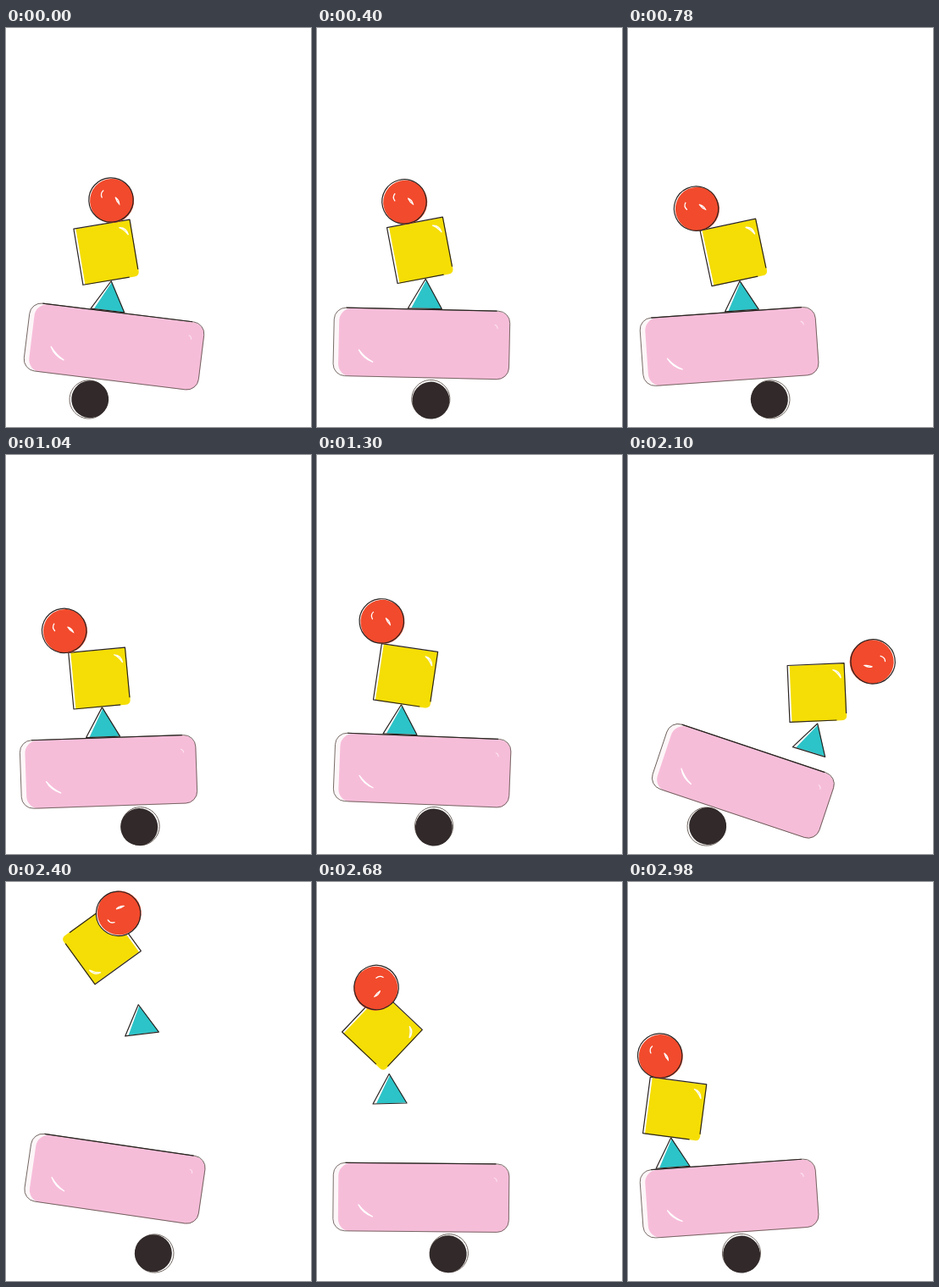
Animation, 360 px wide and 471 px high, one loop 3 s. Source, as an HTML page:

```html
<!DOCTYPE html>
<html lang="en">
<head>
<meta charset="utf-8">
<title>Balancing shapes</title>
<style>
  html, body { margin: 0; width: 100%; height: 100%; overflow: hidden; background: #fff; }
  svg { display: block; width: 360px; height: 471px; }
  .line { fill: none; stroke: #2b2422; stroke-width: 1.2; stroke-linejoin: round; }
  .thin { stroke: #6b605a; stroke-width: .9; }
  .shine { fill: none; stroke: #fff; stroke-width: 1.3; stroke-linecap: round; }
  .faint { stroke-width: 1; opacity: .6; }
</style>
</head>
<body>
<svg viewBox="0 0 360 471">
  <g id="ball">
    <circle class="line thin" cy="-.4" r="22.6"/>
    <circle cy="1.2" r="22" fill="#322a2a"/>
  </g>
  <g id="plank">
    <rect x="-104" y="-40.5" width="207" height="80.5" rx="14" fill="#fdf6f8"/>
    <rect x="-98" y="-40" width="202" height="80.5" rx="15" fill="#f6bdd9"/>
    <rect class="line thin" x="-104" y="-40.5" width="207.5" height="80.5" rx="14"/>
    <path class="line" d="M-90 -40.5H88"/>
    <path class="shine" d="M-74 9Q-69 19 -57 23Q-67 18 -74 9"/>
    <path class="shine faint" d="M86 -24Q89 -23 89 -20"/>
  </g>
  <g id="tri">
    <path d="M0 -35L20 0H-20Z" fill="#fff"/>
    <path d="M1 -34L20 -.5H-16Z" fill="#2cc4c8"/>
    <path class="line" d="M0 -35L20 0H-20Z"/>
  </g>
  <g id="box">
    <path d="M-34 -33H34V33H-34Z" fill="#fff"/>
    <path d="M-31 -33H34V28Q34 34 28 34H-31Z" fill="#f5de05"/>
    <path class="line" d="M33.5 26V-33.5H-33.5V33.5H22"/>
    <path class="shine" d="M20 -26Q28 -25 29 -16Q25 -23 20 -26"/>
  </g>
  <g id="red">
    <circle cx="-.6" cy="-.6" r="26.3" fill="#fff"/>
    <circle cx=".6" cy=".6" r="26" fill="#f24a2c"/>
    <circle class="line" cx="-.4" cy="-.4" r="26.2"/>
    <path class="shine" d="M-9 -12Q-13 -9 -11 -4"/>
    <path class="shine" d="M5 -3Q6 2 9 5Q9 0 5 -3"/>
  </g>
</svg>
<script>
const LOOP = 3000, STEP = 20, SLIP = 1700, TOSS = 2100, PEAK = 2400, LAND = 2780;
const rad = Math.PI / 180;

// Balance: ball x, plank tilt, triangle along plank, box turn, red along box.
const poses = [
  { t: 0, ball: 98, tilt: 7, tri: -13, box: -9.5, red: 16 },
  { t: 780, ball: 168, tilt: -4, tri: 17.5, box: -12, red: -32 },
  { t: 1300, ball: 138, tilt: 2.3, tri: -28, box: 8.5, red: -37 },
  { t: SLIP, ball: 84.5, tilt: 14.3, tri: -2.5, box: 45, red: -2 }
];
const rest = { tri: -64, box: 7.5, red: -25 };
poses.push(
  { t: TOSS, ball: 93, tilt: 18.5, ...rest },
  { t: PEAK, ball: 175, tilt: 8.3, ...rest },
  { t: LOOP - STEP, ball: 134, tilt: -4, ...rest }
);

// Flight: [x, y, turn] when tossed and at the top; dip is the fall before the toss.
const flights = {
  tri: { dip: 22, toss: [213.5, 350.5, 17], peak: [160.5, 179.5, -7], turns: 0 },
  box: { dip: 60, toss: [223, 280.5, -2.5], peak: [112.5, 74, -216], turns: -360 },
  red: { dip: 120, toss: [288.5, 244, 125], peak: [133, 37, -85], turns: -360 }
};

const part = (t, from, to) => Math.min(1, Math.max(0, (t - from) / (to - from)));
const hump = u => Math.sin(Math.PI * u);
const mix = (a, b, u) => a + (b - a) * u;
const slope = (a, b, k) => (b[k] - a[k]) / (b.t - a.t);

// Smooth curve through the poses that never overshoots them.
function tangent(i, k) {
  if (!i || i === poses.length - 1) return 0;
  const a = slope(poses[i - 1], poses[i], k), b = slope(poses[i], poses[i + 1], k);
  return a * b > 0 ? 2 * a * b / (a + b) : 0;
}

function sway(t, k) {
  let i = 0;
  while (i < poses.length - 2 && t >= poses[i + 1].t) i++;
  const a = poses[i], b = poses[i + 1], d = b.t - a.t, u = part(t, a.t, b.t);
  return mix(a[k], b[k], u * u * (3 - 2 * u)) +
    u * (1 - u) * d * (tangent(i, k) * (1 - u) - tangent(i + 1, k) * u);
}

// Point at (dx, dy) in the frame of a placed shape.
function on([x, y, turn], dx, dy) {
  const c = Math.cos(turn * rad), s = Math.sin(turn * rad);
  return [x + dx * c - dy * s, y + dx * s + dy * c];
}

// Everything stacked: each shape rests on the one below.
function stack(t) {
  const x = sway(t, 'ball'), boxTurn = sway(t, 'box'), redAt = sway(t, 'red');
  const tilt = sway(t, 'tilt') + 4 * hump(part(t, SLIP, TOSS));
  const px = 122.7 + .72 * tilt;
  const hop = 16 * hump(part(t, TOSS, 2600));
  const py = 413.2 - 40.3 / Math.cos(tilt * rad) - (x - px) * Math.tan(tilt * rad) - hop;
  const ball = [x, 438.4, (x - 136) / 22.5 / rad];
  const plank = [px, py, tilt];
  const tri = [...on(plank, sway(t, 'tri'), -41.5), tilt];
  const box = [...on([...on(tri, 0, -35), boxTurn], 0, -34.5), boxTurn];
  const red = [...on(box, redAt, -59.5), boxTurn + .4 * redAt];
  return { ball, plank, tri, box, red };
}

const slipped = stack(SLIP);

function fly(id, t, home) {
  const { dip, toss, peak, turns } = flights[id];
  if (t < TOSS) {
    const u = part(t, SLIP, TOSS), h = hump(u) * dip;
    const add = [.55 * h, h, h / 2];
    return toss.map((v, i) => mix(slipped[id][i], v, u) + add[i]);
  }
  if (t < PEAK) {
    const u = part(t, TOSS, PEAK);
    const ease = [u * (3 - u) / 2, u * (2 - u), u];
    return peak.map((v, i) => mix(toss[i], v, ease[i]));
  }
  const u = part(t, PEAK, LAND), ease = [u, u * u, u];
  const end = [home[0], home[1], home[2] + turns];
  return end.map((v, i) => mix(peak[i], v, ease[i]));
}

function draw(t) {
  const scene = stack(t);
  for (const id in scene) {
    const loose = flights[id] && t > SLIP;
    const [x, y, turn] = loose ? fly(id, t, scene[id]) : scene[id];
    document.getElementById(id)
      .setAttribute('transform', `translate(${x} ${y}) rotate(${turn})`);
  }
}

const start = performance.now();
function tick() {
  const t = (performance.now() - start) % LOOP;
  draw(Math.floor(t / STEP) * STEP);
  requestAnimationFrame(tick);
}
draw(0);
requestAnimationFrame(tick);
</script>
</body>
</html>
```
